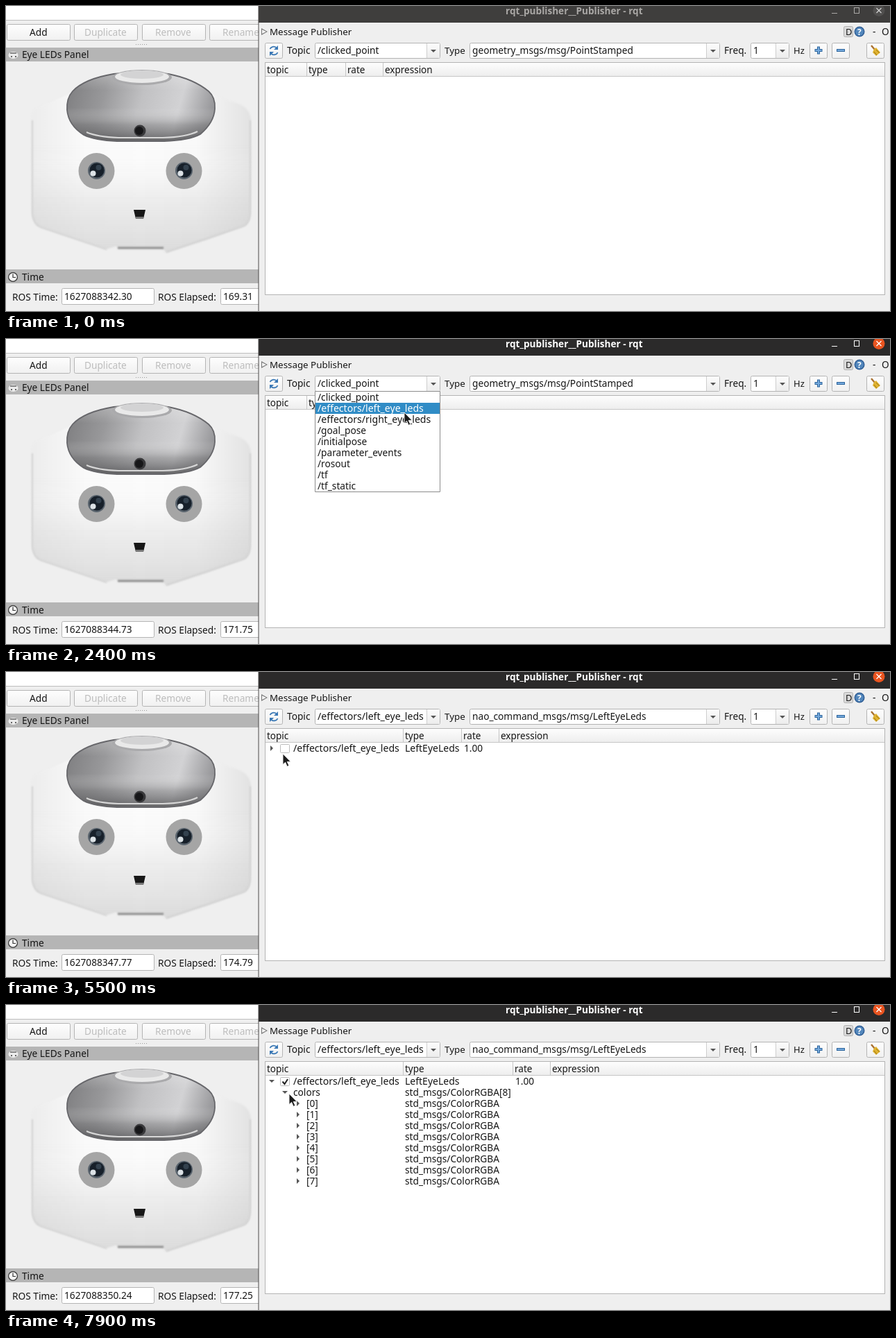
These frames come from a looping animation (1274 by 440 pixels, 8 s). An HTML page with a canvas:

```html
<!DOCTYPE html>
<html lang="en">
<head>
<meta charset="utf-8">
<title>Message Publisher</title>
<style>
html, body { margin: 0; width: 1274px; height: 440px; overflow: hidden; background: #efefef; }
canvas { display: block; }
</style>
</head>
<body>
<canvas id="stage" width="1274" height="440"></canvas>
<script>
const ctx = document.getElementById('stage').getContext('2d');
const LOOP = 8000, STEP = 100;
const FONT = '"Noto Sans", "Open Sans", sans-serif';
const INK = '#161616', EDGE = '#b4b4b4', BLUE = '#3a78b5';
const LEFT_LEDS = '/effectors/left_eye_leds';
const TOPICS = ['/clicked_point', LEFT_LEDS, '/effectors/right_eye_leds', '/goal_pose',
  '/initialpose', '/parameter_events', '/rosout', '/tf', '/tf_static'];

// Moments of each action, in ms
const ACTIVE = 1000, OPEN = 1100, PICK = 2800, ADD = 4500, CHECK = 5900, EXPAND = 6800, COLORS = 7700;

// [time, ROS seconds, elapsed seconds]
const CLOCK = [[0, 342.30, 169.31], [1300, 343.62, 170.63], [2400, 344.73, 171.75], [4400, 346.69, 173.70],
  [5500, 347.77, 174.79], [7000, 349.31, 176.32], [7900, 350.24, 177.25]];
// [time, x, y] of the pointer tip
const PATH = [[300, 598, 19], [700, 608, 58], [1000, 615, 64], [1300, 616, 66], [1900, 616, 66], [2400, 574, 106],
  [2800, 572, 104], [3100, 700, 88], [3600, 965, 70], [4100, 1176, 65], [4400, 1178, 64], [4600, 1177, 60],
  [5300, 400, 121], [5500, 399, 118], [5800, 401, 109], [6200, 401, 111], [6500, 389, 113],
  [7000, 385, 111], [7200, 390, 119], [7600, 406, 127], [7900, 408, 128]];

function track(keys, t, ease) {
  if (t <= keys[0][0]) return keys[0].slice(1);
  for (let i = 1; i < keys.length; i++) {
    const a = keys[i - 1], b = keys[i];
    if (t <= b[0]) {
      let k = (t - a[0]) / (b[0] - a[0]);
      if (ease) k = k * k * (3 - 2 * k);
      return a.slice(1).map((v, j) => v + (b[j + 1] - v) * k);
    }
  }
  return keys[keys.length - 1].slice(1);
}

function rect(x, y, w, h, fill) {
  ctx.fillStyle = fill;
  ctx.fillRect(x, y, w, h);
}
function text(s, x, y, color = INK, size = 13.7, weight = 400) {
  ctx.font = `${weight} ${size}px ${FONT}`;
  ctx.fillStyle = color;
  ctx.fillText(s, x, y);
}
function grad(x0, y0, x1, y1, ...colors) {
  const g = ctx.createLinearGradient(x0, y0, x1, y1);
  colors.forEach((c, i) => g.addColorStop(i / (colors.length - 1), c));
  return g;
}
function box(x, y, w, h, fill = '#fff', edge = EDGE, r = 2) {
  ctx.beginPath();
  ctx.roundRect(x + 0.5, y + 0.5, w - 1, h - 1, r);
  ctx.fillStyle = fill;
  ctx.fill();
  ctx.strokeStyle = edge;
  ctx.lineWidth = 1;
  ctx.stroke();
}
function button(x, y, w, h, down) {
  box(x, y, w, h, down ? '#d2d2d2' : grad(0, y, 0, y + h, '#fefefe', '#f0f0f0'), down ? '#a4a4a4' : EDGE);
}
function disc(x, y, r, fill, ry = r) {
  ctx.beginPath();
  ctx.ellipse(x, y, r, ry, 0, 0, 7);
  ctx.fillStyle = fill;
  ctx.fill();
}
function shape(d, fill) {
  ctx.fillStyle = fill;
  ctx.fill(new Path2D(d));
}
function line(d, color, width = 1) {
  ctx.strokeStyle = color;
  ctx.lineWidth = width;
  ctx.stroke(new Path2D(d));
}
function combo(x, w, s, down, size) {
  box(x, 53, w, 23);
  const bx = x + w - 19;
  rect(bx, 54, 18, 21, down ? '#d0d0d0' : grad(0, 54, 0, 75, '#fcfcfc', '#ececec'));
  rect(bx - 1, 54, 1, 21, '#cecece');
  shape(`M${bx + 5} 63h8l-4 4z`, '#555');
  text(s, x + 4, 69, INK, size);
}
function blurred(px, draw) {
  ctx.save();
  ctx.filter = `blur(${px}px)`;
  draw();
  ctx.restore();
}

function head() {
  const body = 'M36 162Q36 148 60 140Q82 132 108 118L280 118Q305 132 330 139Q352 146 353 164' +
    'L352 300Q351 315 341 318L290 337L231 356L225 350H163L158 347L145 351L100 336L48 318Q39 315 38 300Z';
  blurred(1.2, () => {
    shape(body, grad(36, 0, 353, 0, '#ececec', '#fafafa', '#fcfcfc', '#f9f9f9', '#e2e2e2'));
    shape(body, grad(0, 120, 0, 356, '#ffffff00', '#ffffff00', '#d8d8d866', '#c6c6c699'));
    line('M38 165V300Q40 315 50 319L145 351M352 165V300Q350 315 341 318L231 355', '#d2d2d2', 2);
    line('M161 349H227', '#8e8e8e', 3);
  });
  const cap = 'M155 98Q113 105 96 123Q87 133 88 150Q90 172 112 186Q128 194 160 195H228' +
    'Q264 194 280 185Q300 168 301 148Q302 132 292 123Q270 105 234 98Q195 93 155 98Z';
  blurred(0.7, () => {
    shape(cap, grad(88, 110, 300, 170, '#7e7e80', '#98989a', '#c1c1c3', '#d2d2d4', '#8d8d90'));
    shape(cap, grad(0, 97, 0, 196, '#ffffff40', '#ffffff00', '#ffffff00', '#6a6a6c66', '#48484acc'));
    line(cap, '#66666a', 1.8);
    line('M116 182Q132 189 162 190H226Q260 189 276 181', '#d7d7d7', 2);
    disc(196, 103, 43, '#aaaaac', 11);
    disc(196, 102, 39, '#e9e9e9', 9);
    disc(196, 99, 31, '#d3d3d4', 6);
  });
  disc(193, 180, 8.5, '#39393b');
  disc(192, 180, 6, '#171719');
  for (const x of [130.5, 256.5]) {
    disc(x, 238, 26, '#a5a5a5');
    blurred(0.6, () => {
      disc(x, 237.5, 12.5, '#59636d');
      disc(x + 0.5, 237, 10.5, '#17202a');
      disc(x + 3, 233, 4, '#33414e');
      disc(x - 5, 241.5, 4, '#dce2e6');
    });
  }
  blurred(0.5, () => {
    shape('M184 294H201L198 307H187Z', '#171717');
    shape('M187 304H198V307H187Z', '#777');
  });
}

function leftPanel(t) {
  rect(0, 0, 366, 440, '#efefef');
  rect(0, 0, 366, 20, '#fff');
  rect(0, 20, 366, 1, '#bdbdbd');
  ['Add', 'Duplicate', 'Remove', 'Rename'].forEach((s, i) => {
    button(1 + Math.round(i * 97.3), 26, 92, 24);
    text(s, [34, 113, 215, 312][i], 43, i ? '#bdbdbd' : INK);
  });
  for (let x = 187; x < 203; x += 3) rect(x, 55, 1, 1, '#999');
  for (const y of [60, 380]) rect(0, y, 366, 20, '#b5b5b5');
  disc(10.5, 71, 7, '#ececec', 5);
  rect(6, 67, 9, 2, '#888');
  rect(7, 72, 2, 2, '#666');
  rect(13, 72, 2, 2, '#666');
  text('Eye LEDs Panel', 23, 75);
  head();
  disc(10, 391, 7, '#333');
  disc(10, 391, 5.8, '#f4f4f4');
  line('M10 386.5V391.5H14', '#333', 1.2);
  text('Time', 23, 396);
  const [ros, elapsed] = track(CLOCK, t);
  text('ROS Time:', 9, 425);
  box(80, 407, 134, 24);
  text('1627088' + ros.toFixed(2), 84, 424);
  text('ROS Elapsed:', 219, 425);
  box(309, 407, 80, 24);
  text(elapsed.toFixed(2), 313, 424);
}

function titleBar(on) {
  rect(364, 0, 910, 24, on ? '#2b2a2a' : '#3f3e3d');
  const c = on ? '#fff' : '#aaa8a6';
  text('rqt_publisher__Publisher - rqt', 720, 12, c, 13.6, 700);
  rect(1190, 10, 8, 1, c);
  ctx.strokeStyle = c;
  ctx.lineWidth = 1;
  ctx.strokeRect(1222.5, 2.5, 7, 8);
  disc(1258, 6.5, 8.5, on ? '#e95420' : '#504f4e');
  line('M1254.5 3l7 7m0-7l-7 7', on ? '#fff' : '#d0d0d0', 1.3);
}

function toolbar(t, y) {
  const picked = t >= PICK;
  shape('M368 32V42L377 37Z', '#777');
  shape('M369 34V40L375 37Z', '#f4f4f4');
  text('Message Publisher', 380, 42, INK, 13.35);
  box(1207, 29, 14, 16, '#dadada', '#b0b0b0');
  text('D', 1210, 42, INK, 13);
  disc(1230, 37, 7.5, '#315f96');
  disc(1230, 37, 6, '#5387bc');
  text('?', 1227, 42, '#fff', 12, 700);
  text('-', 1249, 42);
  text('O', 1262, 42);

  button(373, 53, 26, 23);
  line('M380.5 62a5.5 5 0 0 1 9-2M391.5 67a5.5 5 0 0 1-9 2', BLUE, 1.8);
  shape('M392 57v6h-6zM380 72v-6h6z', BLUE);
  text('Topic', 405, 69);
  combo(445, 181, picked ? LEFT_LEDS : TOPICS[0], t >= OPEN && !picked && y < 76, picked ? 14.1 : 13.7);
  text('Type', 632, 69, INK, 13.4);
  combo(668, 361, picked ? 'nao_command_msgs/msg/LeftEyeLeds' : 'geometry_msgs/msg/PointStamped');
  text('Freq.', 1035, 69);
  combo(1073, 56, '1');
  text('Hz', 1135, 69, INK, 13);
  button(1158, 53, 26, 23, t >= 4200 && t < ADD);
  line('M1171 58.5v11M1165.5 64h11', '#2d659d', 4);
  line('M1171 59.5v9M1166.5 64h9', '#75a9dc', 2);
  button(1190, 53, 26, 23);
  rect(1197, 62, 12, 4, '#2d659d');
  rect(1198, 63, 10, 2, '#75a9dc');
  button(1240, 53, 26, 23);
  line('M1247 57l6 7', '#a9712f', 2.4);
  shape('M1251 62l3-2 6 7-6 5-5-5z', '#e0b331');
  line('M1251 66l4 5M1254 63l5 5', '#9a7312');
}

function arrow(x, y, open) {
  shape(open ? `M${x - 4} ${y - 2}h8l-4 4z` : `M${x - 2} ${y - 4}v8l4-4z`, '#555');
}

function table(t) {
  const added = t >= ADD, open = t >= EXPAND;
  ctx.strokeStyle = EDGE;
  ctx.lineWidth = 1;
  rect(373, 81, 894, 336, '#fff');
  rect(374, 82, 892, 20, grad(0, 82, 0, 102, '#fdfdfd', '#ededed'));
  rect(374, 101, 892, 1, '#c6c6c6');
  ctx.strokeRect(373.5, 81.5, 893, 335);
  const cols = open ? [572, 730, 784] : added ? [572, 656, 710] : [433, 489, 543];
  text('topic', 376, 97, INK, 13.5);
  ['type', 'rate', 'expression'].forEach((s, i) => {
    rect(cols[i], 82, 1, 19, '#c6c6c6');
    text(s, cols[i] + 3, 97, INK, 13.5);
  });
  if (!added) return;
  arrow(383, 110, open);
  box(395, 104, 14, 13, '#fff', '#bcbcbc', 1);
  if (t >= CHECK) line('M398.5 110.5l3 3.5 4.5-7', '#222', 2);
  text(LEFT_LEDS, 414, 115, INK, 14.1);
  text('LeftEyeLeds', 575, 115, INK, 14);
  text('1.00', cols[1] + 4, 115);
  if (!open) return;
  arrow(402, 126, t >= COLORS);
  text('colors', 414, 131);
  text('std_msgs/ColorRGBA[8]', 575, 131);
  if (t < COLORS) return;
  for (let i = 0; i < 8; i++) {
    const y = 142 + 16 * i;
    arrow(421, y, false);
    text(`[${i}]`, 433, y + 5);
    text('std_msgs/ColorRGBA', 575, y + 5);
  }
}

function popup(y) {
  box(445, 75, 181, 146, '#fff', '#8c8c8c', 0);
  const row = Math.max(0, Math.floor((y - 76) / 16));
  TOPICS.forEach((s, i) => {
    if (i === row) rect(446, 76 + 16 * i, 179, 16, '#308cc6');
    text(s, 449, 89 + 16 * i, i === row ? '#fff' : INK, i === 1 || i === 2 ? 14.1 : 13.7);
  });
}

function pointer(x, y) {
  const d = `M${x} ${y}v15.5l3.6-3.2 2.6 6 2.6-1.2-2.6-5.7h5z`;
  shape(d, '#1b1b1b');
  line(d, '#f4f4f4', 0.9);
}

function draw(t) {
  const [x, y] = track(PATH, t, true);
  leftPanel(t);
  rect(364, 0, 910, 440, '#efefef');
  titleBar(t >= ACTIVE);
  rect(363.5, 0, 1, 440, '#4c4b4a');
  toolbar(t, y);
  table(t);
  if (t >= OPEN && t < PICK) popup(y);
  if (t >= PATH[0][0]) pointer(x, y);
}

const start = performance.now();
function tick() {
  const t = (performance.now() - start) % LOOP;
  draw(Math.floor(t / STEP) * STEP);
  requestAnimationFrame(tick);
}
tick();
</script>
</body>
</html>
```
